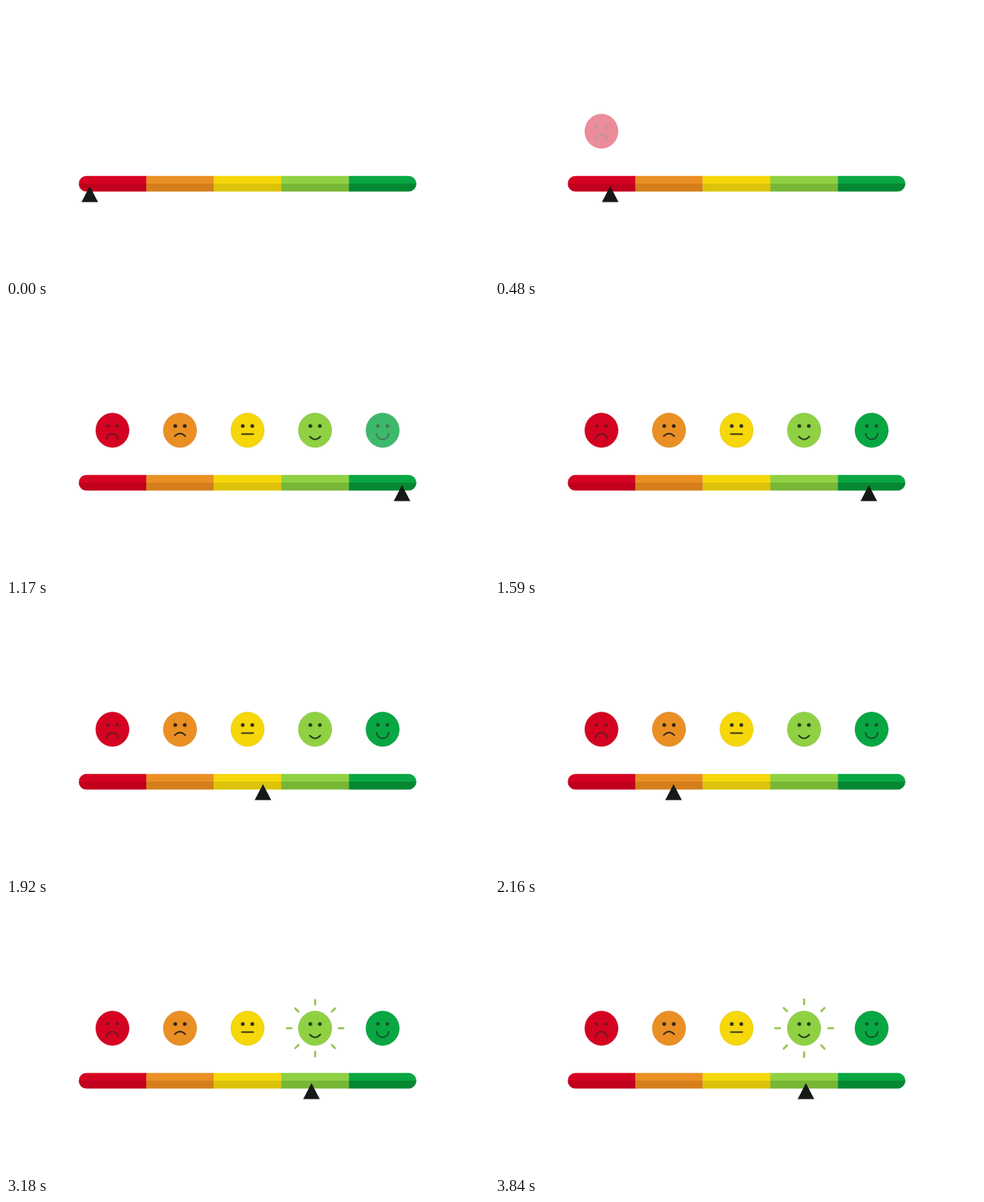
An HTML page that plays this animation: 640 px wide and 360 px high, repeating every 4.5 s.

```html
<!DOCTYPE html>
<html lang="en">
<head>
<meta charset="utf-8">
<title>Mood scale</title>
<style>
  html, body { margin: 0; width: 100%; height: 100%; overflow: hidden; background: #fff; }
  svg { display: block; width: 100%; height: 100%; }
</style>
</head>
<body>
<svg viewBox="0 0 640 360">
  <defs>
    <clipPath id="pill"><rect x="96.3" y="225.8" width="447.5" height="20.8" rx="10.4"/></clipPath>
  </defs>
  <g id="bar" clip-path="url(#pill)"></g>
  <g id="rays" stroke="#9ac45a" stroke-width="2.8" stroke-linecap="round"></g>
  <g id="faces" stroke-linecap="round" fill="none"></g>
  <path id="pointer" d="M0 239.3L11 260.6H-11Z" fill="#161a16"/>
</svg>
<script>
const LOOP = 4500, STEP = 30;
const BAR_LEFT = 96.3, SEGMENT = 89.5, FACE_Y = 166.4;

// Face colour, lower bar colour, feature colour, mouth path, eye radius
const moods = [
  ['#d50322', '#c1001d', '#6d1820', 'M-7.8 11.5Q-6.5 4.6 0 4.6T7.8 11.5', 2.1],
  ['#e98f24', '#d57e1b', '#33291c', 'M-7 8Q0 .8 7 8', 2.5],
  ['#f5d70a', '#dcc30a', '#38341a', 'M-7.5 5.2H7.5', 2.5],
  ['#8fd143', '#78b636', '#26401c', 'M-7 8.3Q0 15.7 7 8.3', 2.5],
  ['#08a743', '#068732', '#17502a', 'M-8 4.5C-7 14.5 7 14.5 8 4.5', 2.4]
];

// Pointer moves: start time, end time, from x, to x
const moves = [
  [299, 1225, 111, 529],
  [1405, 2323, 529, 210],
  [2500, 3267, 210, 412]
];

const byId = id => document.getElementById(id);
const progress = (t, start, end) => Math.min(1, Math.max(0, (t - start) / (end - start)));
const smooth = u => u * u * (3 - 2 * u);
const backOut = u => 1 + 2.70158 * (u - 1) ** 3 + 1.70158 * (u - 1) ** 2;

function add(parent, tag, attributes) {
  const node = document.createElementNS('http://www.w3.org/2000/svg', tag);
  for (const name in attributes) node.setAttribute(name, attributes[name]);
  return parent.appendChild(node);
}

const faces = moods.map(([color, shade, ink, mouth, eye], i) => {
  const x = BAR_LEFT + i * SEGMENT;
  add(byId('bar'), 'rect', { x, y: 225, width: SEGMENT + 0.3, height: 11.2, fill: color });
  add(byId('bar'), 'rect', { x, y: 236, width: SEGMENT + 0.3, height: 12, fill: shade });

  const face = add(byId('faces'), 'g', { transform: `translate(${x + SEGMENT / 2} ${FACE_Y})` });
  add(face, 'ellipse', { rx: 22.1, ry: 22.9, fill: color, stroke: shade, 'stroke-width': 0.5 });
  for (const side of [-1, 1])
    add(face, 'circle', { cx: side * 6.3, cy: -5.7, r: eye, fill: ink });
  add(face, 'path', { d: mouth, stroke: ink, 'stroke-width': 2 });
  return face;
});

for (let angle = 0; angle < 360; angle += 45)
  add(byId('rays'), 'path', { d: 'M32 0H38.2', transform: `rotate(${angle})` });

function draw(t) {
  let x = moves[0][2];
  for (const [start, end, from, to] of moves)
    if (t >= start) x = from + (to - from) * smooth(progress(t, start, end));
  byId('pointer').setAttribute('transform', `translate(${x} 0)`);

  faces.forEach((face, i) => {
    const start = 408 + 159 * i;
    face.setAttribute('opacity', progress(t, start, start + 160));
  });

  const burst = progress(t, 2990, 3530);
  byId('rays').setAttribute('visibility', burst > 0 ? 'visible' : 'hidden');
  byId('rays').setAttribute('transform', `translate(409.6 ${FACE_Y}) scale(${backOut(burst)})`);
}

const origin = performance.now();
function tick() {
  const t = (performance.now() - origin) % LOOP;
  draw(Math.floor(t / STEP) * STEP);
  requestAnimationFrame(tick);
}
tick();
</script>
</body>
</html>
```
